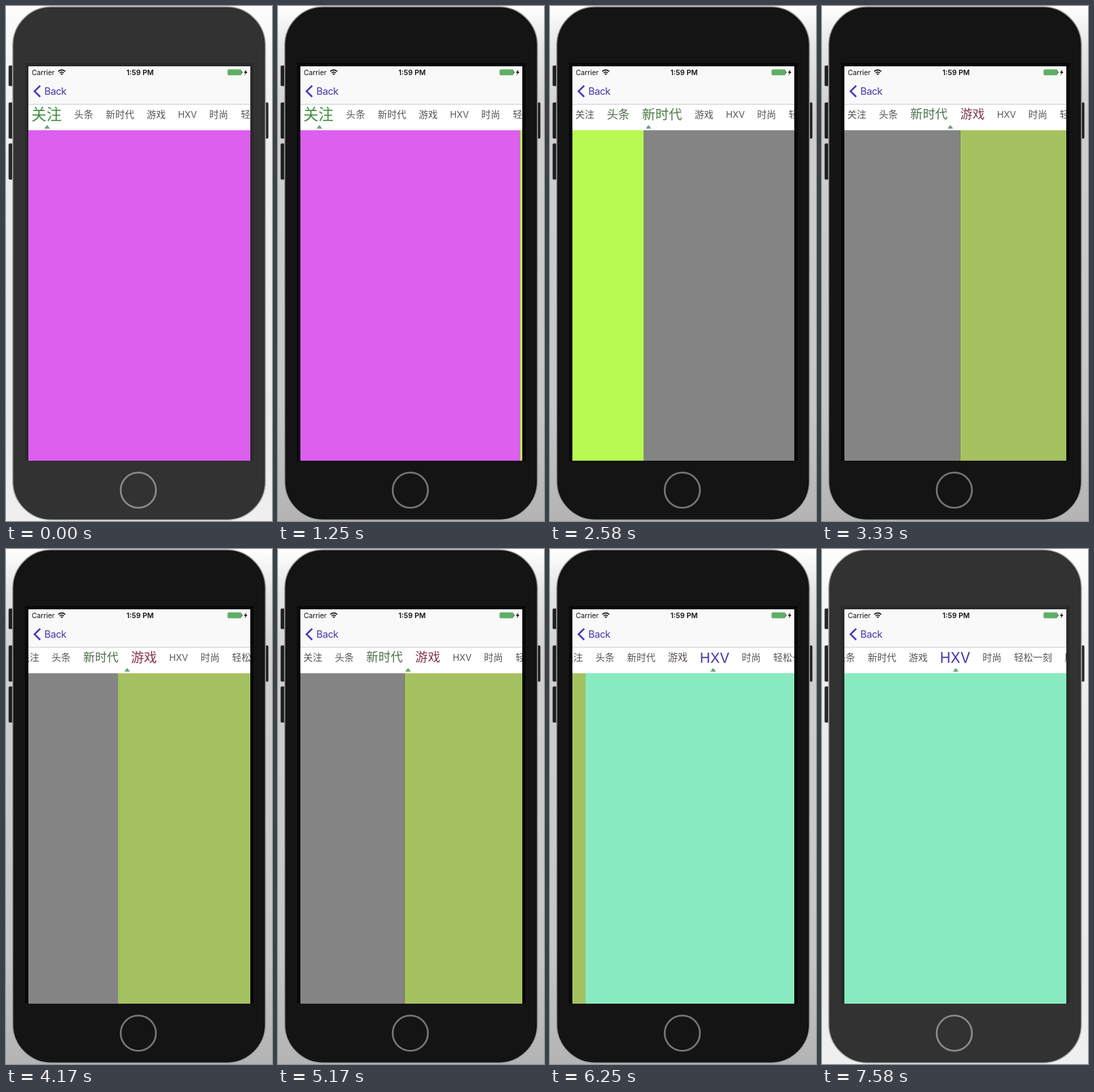
Write an HTML page that moves like this. It is 392x760 px and loops after 8580 ms.

```html
<!DOCTYPE html>
<html lang="zh-CN">
<head>
<meta charset="utf-8">
<title>Tab pager</title>
<style>
  html, body { margin: 0; width: 100%; height: 100%; overflow: hidden; background: #eee; }
  svg { display: block; }
  #stage {
    width: 100vw; height: 100vh;
    --body: #323232; --bezel: #2a2a2a; --rim: #b4b4b4; --ring: #8c8c8c; --key: #242627;
    background: linear-gradient(#fdfdfd, #f4f4f4 90px, #ebebeb 260px, #e9e9e9 600px, #f0f0f0);
  }
  #stage.active {
    --body: #141414; --bezel: #080808; --rim: #a2a2a2; --ring: #777; --key: #1c1e1f;
    background: linear-gradient(#fff, #e6e6e6 60px, #cfcfcf 160px, #c6c6c6 600px, #b4b4b4);
  }
  .body { fill: var(--body); stroke: var(--rim); stroke-width: 1.5; }
  .bezel { fill: var(--bezel); }
  .keys { fill: var(--key); stroke: #555; stroke-width: .6; }
  .home { fill: none; stroke: var(--ring); stroke-width: 2.6; }
  text { font-family: Inter, "Noto Sans CJK SC", "Noto Sans CJK", sans-serif; }
  #tabs text { font-family: "Noto Sans CJK SC", "Noto Sans CJK", sans-serif; font-size: 14px; text-anchor: middle; }
  #tabs text.latin { font-family: Inter, sans-serif; font-size: 13.2px; }
</style>
</head>
<body>
<svg id="stage" viewBox="0 0 392 760" preserveAspectRatio="none">
  <defs>
    <clipPath id="screen"><rect x="33" y="89" width="327" height="582"/></clipPath>
  </defs>

  <g class="keys">
    <rect x="4" y="88" width="8" height="30" rx="1.5"/>
    <rect x="4" y="142.5" width="8" height="53" rx="1.5"/>
    <rect x="4" y="203" width="8" height="53" rx="1.5"/>
    <rect x="380" y="142.5" width="6.5" height="53" rx="1.5"/>
  </g>
  <rect class="body" x="9.8" y="1" width="372.6" height="757.5" rx="57"/>
  <rect class="bezel" x="28" y="84" width="337" height="587"/>
  <circle class="home" cx="195" cy="714.5" r="26"/>

  <g clip-path="url(#screen)">
    <g id="pages"></g>
    <rect x="33" y="89" width="327" height="56" fill="#f8f9f8"/>
    <rect x="33" y="145" width="327" height="38.3" fill="#fff"/>
    <rect x="33" y="144.6" width="327" height="1" fill="#c9c9c9"/>

    <text x="38" y="102" font-size="10.3" fill="#111">Carrier</text>
    <g fill="none" stroke="#111" stroke-width="1.5">
      <path d="M77 96.6Q82.2 92.2 87.4 96.6"/>
      <path d="M79 98.9Q82.2 96.2 85.4 98.9"/>
    </g>
    <path d="M80.4 100.2Q82.2 98.7 84 100.2L82.2 102Z" fill="#111"/>
    <text x="197.6" y="102" font-size="10.5" font-weight="600" text-anchor="middle" fill="#111">1:59 PM</text>
    <rect x="326.5" y="93.6" width="20.5" height="8.6" rx="1.6" fill="#5fae66"/>
    <path d="M347.4 96.2Q349 97.9 347.4 99.6Z" fill="#5fae66" stroke="#333" stroke-width=".6"/>
    <path d="M354.4 93.4L350.4 98.6H352.8L351.7 102.2L355.8 96.9H353.3Z" fill="#111"/>

    <path d="M50.4 117.6L42 125.8L50.4 134" fill="none" stroke="#4636b4" stroke-width="2.5"/>
    <text x="56.6" y="131" font-size="14.5" letter-spacing="-.4" fill="#4338b0">Back</text>

    <g id="tabs"></g>
    <path id="mark" d="M-4 181L-1 176.6Q0 175.4 1 176.6L4 181Z" fill="#69a57b"/>
  </g>
</svg>

<script>
const LOOP = 8580, PAGE_W = 327, LEFT = 33, CENTER = 196.2;
const TAB_X = 37.3, GAP = 18.4, GROW = 0.6, SCROLL_MS = 350;
const GREY = [85, 85, 85];

// label, width at rest, colour when selected
const TABS = [
  ['关注', 28, [62, 143, 62]],
  ['头条', 28, [60, 150, 62]],
  ['新时代', 42, [72, 143, 64]],
  ['游戏', 28, [173, 23, 60]],
  ['HXV', 27.5, [68, 52, 168]],
  ['时尚', 28, GREY],
  ['轻松一刻', 56, GREY],
  ['股票', 28, GREY]
];
const PAGES = ['#dc5fee', '#b9fa50', '#848484', '#a5c160', '#88ebbf'];

// start, duration, from page, to page
const SWIPES = [
  [1230, 910, 0, 1],
  [2150, 894, 1, 2],
  [3050, 800, 2, 3],
  [3880, 950, 3, 2],
  [4850, 837, 2, 3],
  [5690, 756, 3, 4]
];

const $ = id => document.getElementById(id);
const stage = $('stage'), pages = $('pages'), tabs = $('tabs'), mark = $('mark');
const add = (parent, tag, attrs) => {
  const el = document.createElementNS('http://www.w3.org/2000/svg', tag);
  for (const k in attrs) el.setAttribute(k, attrs[k]);
  return parent.appendChild(el);
};

PAGES.forEach((fill, i) =>
  add(pages, 'rect', { x: LEFT + i * PAGE_W, y: 183, width: PAGE_W, height: 490, fill }));
const labels = TABS.map(([name]) => {
  const el = add(tabs, 'text', { y: 5.2 });
  el.textContent = name;
  if (/^[A-Z]/.test(name)) el.setAttribute('class', 'latin');
  return el;
});

const clamp = u => Math.min(1, Math.max(0, u));
const lerp = (a, b, u) => a + (b - a) * u;
const swipeEase = u => 1 - (1 - u ** 1.5) ** 2.8;
const smooth = u => u * u * (3 - 2 * u);

function layout(offset) {
  let x = TAB_X;
  return TABS.map(([, width]  , i) => {
    const near = clamp(1 - Math.abs(i - offset));
    const scale = 1 + GROW * near;
    const mid = x + width * scale / 2;
    x += width * scale + GAP;
    return { near, scale, mid };
  });
}

const scrollFor = page => Math.max(0, layout(page)[page].mid - CENTER);

function state(t) {
  let offset = 0, scroll = 0;
  for (const [start, dur, from, to] of SWIPES) {
    if (t < start) break;
    offset = lerp(from, to, swipeEase(clamp((t - start) / dur)));
    const u = clamp((t - start - dur) / SCROLL_MS);
    scroll = lerp(scroll, scrollFor(to), smooth(u));
  }
  return { offset, scroll };
}

const snap = t => Math.round(Math.floor((t + 3.4) * 0.012) / 0.12) * 10;

function draw(now) {
  const t = now % LOOP;
  const { offset, scroll } = state(snap(t));
  stage.classList.toggle('active', t >= 170 && t < 7580);
  pages.setAttribute('transform', `translate(${-offset * PAGE_W} 0)`);

  const items = layout(offset);
  items.forEach(({ near, scale, mid }, i) => {
    const rgb = GREY.map((c, j) => Math.round(lerp(c, TABS[i][2][j], near)));
    labels[i].setAttribute('transform', `translate(${mid - scroll} 159.6) scale(${scale})`);
    labels[i].setAttribute('fill', `rgb(${rgb})`);
  });

  const i = Math.floor(offset);
  const x = lerp(items[i].mid, items[i + 1].mid, offset - i) - scroll + 0.9;
  mark.setAttribute('transform', `translate(${x} 0)`);
}

function tick() {
  draw(performance.now());
  requestAnimationFrame(tick);
}
tick();
</script>
</body>
</html>
```
